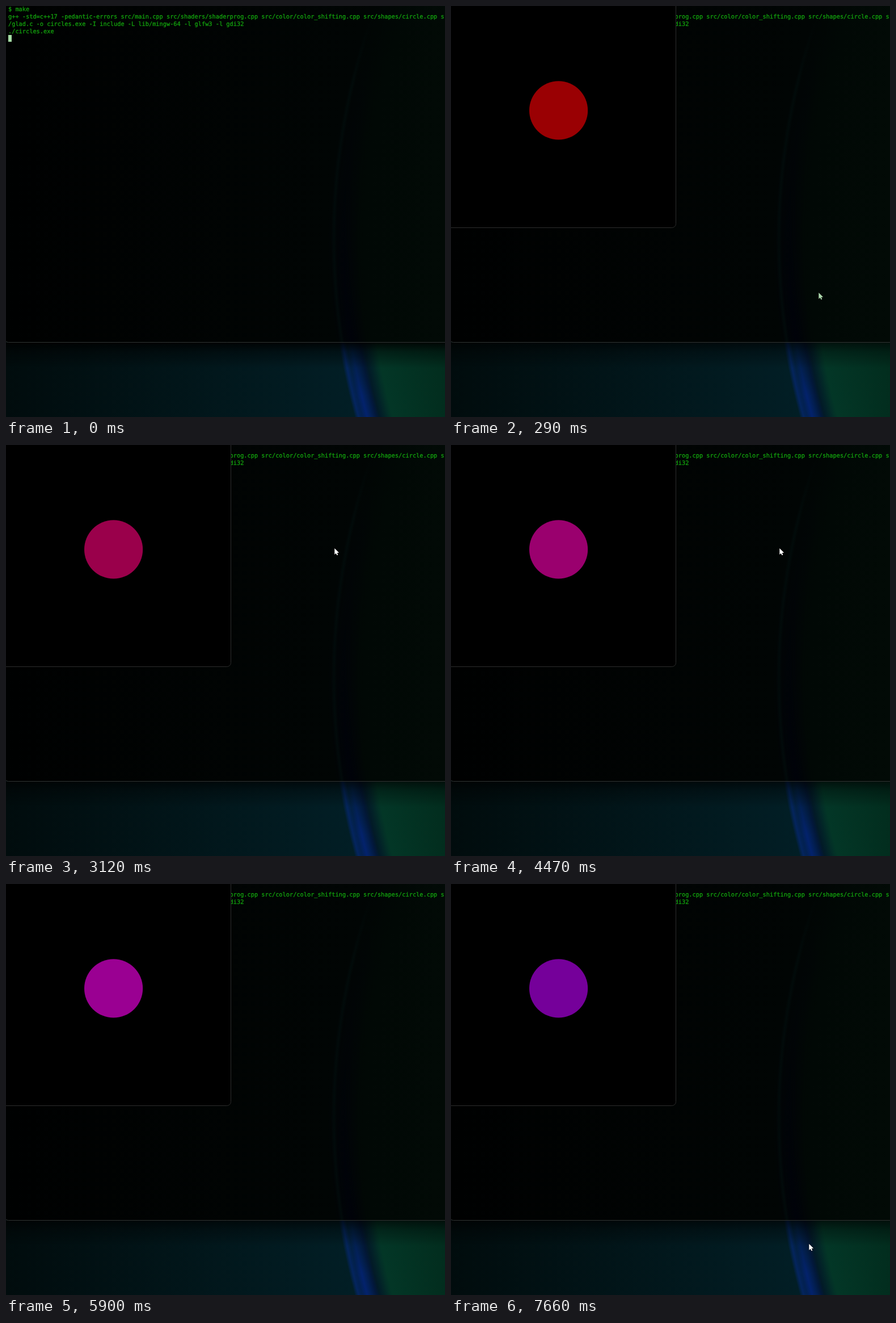
Animation of 774x724 px, one loop 8 s. Source, as an HTML page with a canvas:

```html
<!DOCTYPE html>
<html lang="en">
<head>
<meta charset="utf-8">
<title>Circle colour shift</title>
<style>
html, body { margin: 0; width: 100%; height: 100%; overflow: hidden; background: #000; }
canvas { display: block; }
</style>
</head>
<body>
<canvas id="stage" width="774" height="724"></canvas>
<script>
const W = 774, H = 724, LOOP = 8000;
const FLOOR = 593; // lower edge of the terminal
const OPEN_START = 50, OPEN_END = 290, OPEN_STEPS = 6;
const ctx = document.getElementById('stage').getContext('2d');

const LINES = [
  '$ make',
  'g++ -std=c++17 -pedantic-errors src/main.cpp src/shaders/shaderprog.cpp src/color/color_shifting.cpp src/shapes/circle.cpp s',
  '/glad.c -o circles.exe -I include -L lib/mingw-64 -l glfw3 -l gdi32',
  './circles.exe'
];

// Pointer strokes: each is a Bézier curve continuing from the previous end
const HOME = [648, 505];
const MOVES = [
  { start: 1490, end: 1580, steps: 3, via: [[690, 300]], to: [686, 86] },
  { start: 2000, end: 2370, steps: 8, via: [[660, -10], [540, 220]], to: [520, 232] },
  { start: 2740, end: 2980, steps: 6, via: [[540, 246]], to: [579, 182] },
  { start: 4890, end: 5250, steps: 9, via: [[650, 360]], to: [764, 730] },
  { start: 6460, end: 6640, steps: 5, via: [[700, 600]], to: [645, 551] },
  { start: 6780, end: 6970, steps: 5, via: [[620, 600]], to: [631, 634] }
];
// Redraws while the pointer rests
const REDRAWS = [OPEN_END, 930, 3120, 3760, 4470, 5900, 7660];

const clamp = v => Math.max(0, Math.min(1, v));
const smooth = u => u * u * (3 - 2 * u);
const lerp = (a, b, u) => a.map((v, i) => v + (b[i] - v) * u);

function bezier(points, u) {
  while (points.length > 1) points = points.slice(1).map((p, i) => lerp(points[i], p, u));
  return points[0];
}

function stepIndex({ start, end, steps }, t) {
  const gap = (end - start) / (steps - 1);
  return Math.min(steps - 1, Math.floor((t - start) / gap + 0.001));
}

function pointerAt(t) {
  let tip = HOME;
  for (const move of MOVES) {
    if (t < move.start) break;
    const u = smooth((stepIndex(move, t) + 1) / move.steps);
    tip = bezier([tip, ...move.via, move.to], u);
  }
  return tip;
}

// Time of the latest redraw at or before t
function redrawTime(t) {
  const moving = MOVES.filter(m => m.start <= t)
    .map(m => m.start + (m.end - m.start) / (m.steps - 1) * stepIndex(m, t));
  return Math.max(OPEN_END, ...REDRAWS.filter(r => r <= t), ...moving);
}

// Blue rises to the limit, then red falls
function circleColor(t) {
  const limit = 154, shift = 3 + (redrawTime(t) - OPEN_END) * 0.0255;
  return `rgb(${Math.min(limit, 2 * limit - shift)}, 0, ${Math.min(limit, shift)})`;
}

// The wallpaper's planet rim is a parabola
const rim = y => 577 + 0.000437 * (y - 410) ** 2;

function fillRow(g, y, left, mid, nearRight, right) {
  const grad = g.createLinearGradient(0, 0, W, 0);
  grad.addColorStop(0, left);
  grad.addColorStop((rim(y) - 2) / W, mid);
  grad.addColorStop((rim(y) + 55) / W, nearRight);
  grad.addColorStop(1, right);
  g.fillStyle = grad;
  g.fillRect(0, y, W, 1);
}

// Soft streak that follows the rim at distance dx
function streak(g, y, dx, half, color, alpha) {
  const x = rim(y) + dx;
  const grad = g.createLinearGradient(x - half, 0, x + half, 0);
  grad.addColorStop(0, color + '00');
  grad.addColorStop(0.5, color);
  grad.addColorStop(1, color + '00');
  g.globalAlpha = alpha;
  g.fillStyle = grad;
  g.fillRect(x - half, y, 2 * half, 1);
  g.globalAlpha = 1;
}

function drawWallpaper(g, shade) {
  for (let y = FLOOR - 10; y < H; y++) {
    const glow = clamp((y - 585) / 100);
    fillRow(g, y, '#010c0d', '#021e25', '#033727', '#022d1e');
    streak(g, y, 32, 30, '#021428', 1);
    streak(g, y, 2, 7, '#04265e', 0.9);
    streak(g, y, 17, 22, '#03226c', 0.25 + 0.75 * glow);
  }
  const shadow = g.createLinearGradient(0, FLOOR, 0, FLOOR + 45);
  shadow.addColorStop(0, `rgba(0,0,0,${shade})`);
  shadow.addColorStop(0.35, `rgba(0,0,0,${shade * 0.5})`);
  shadow.addColorStop(1, 'rgba(0,0,0,0)');
  g.fillStyle = shadow;
  g.fillRect(0, FLOOR, W, 45);
}

function drawTerminal(g) {
  g.save();
  g.beginPath();
  g.roundRect(-2.5, -20, W + 40, FLOOR + 19.5, 7);
  g.clip();
  for (let y = 0; y < FLOOR; y++) {
    const depth = clamp((y - 40) / 540);
    fillRow(g, y, '#000101', '#010504', '#010805', '#020a06');
    streak(g, y, 18, 28, '#000209', depth);
    streak(g, y, 1, 5, '#02100f', 0.5 * clamp((y - 20) / 120));
  }
  g.restore();
  g.strokeStyle = '#303332';
  g.stroke();

  g.font = '10.3px "DejaVu Sans Mono", monospace';
  g.textRendering = 'geometricPrecision';
  g.fillStyle = g.strokeStyle = '#13a10e';
  g.lineWidth = 0.3;
  LINES.forEach((line, i) => {
    g.fillText(line, 4, 8.5 + 13 * i);
    g.strokeText(line, 4, 8.5 + 13 * i);
  });
  g.fillStyle = '#a5dca5';
  g.fillRect(4, 51, 6, 12);
}

function makeBackdrop(shade) {
  const layer = document.createElement('canvas');
  layer.width = W;
  layer.height = H;
  const g = layer.getContext('2d');
  drawWallpaper(g, shade);
  drawTerminal(g);
  return layer;
}

const focused = makeBackdrop(0.85), unfocused = makeBackdrop(0.65);

function drawWindow(t) {
  const gap = (OPEN_END - OPEN_START) / (OPEN_STEPS - 1);
  const p = clamp((Math.floor((t - OPEN_START) / gap + 0.001) + 1) / OPEN_STEPS);
  const ease = 1 - (1 - p) ** 3, scale = 0.9 + 0.1 * ease;
  ctx.save();
  ctx.globalAlpha = ease;
  ctx.translate(190, 170);
  ctx.scale(scale, scale);
  ctx.translate(-190, -170);
  ctx.beginPath();
  ctx.roundRect(-16.5, -55.5, 413, 446, 7);
  ctx.fillStyle = '#000';
  ctx.fill();
  ctx.strokeStyle = '#2c2c2c';
  ctx.stroke();
  ctx.beginPath();
  ctx.arc(189.6, 183.9, 51.6, 0, Math.PI * 2);
  ctx.fillStyle = circleColor(t);
  ctx.fill();
  ctx.restore();
}

function drawPointer([x, y], color) {
  const arrow = [[0, 0], [0, 11], [2.5, 8.7], [4.2, 12.2], [6, 11.4], [4.4, 8], [7.8, 7.8]];
  ctx.beginPath();
  for (const [dx, dy] of arrow) ctx.lineTo(x + dx + 0.3, y + dy);
  ctx.closePath();
  ctx.strokeStyle = '#000';
  ctx.stroke();
  ctx.fillStyle = color;
  ctx.fill();
}

function draw() {
  const t = performance.now() % LOOP;
  ctx.drawImage(t < OPEN_START ? focused : unfocused, 0, 0);
  if (t >= OPEN_START) drawWindow(t);
  if (t >= OPEN_END) drawPointer(pointerAt(t), t < MOVES[0].start ? '#acd8ac' : '#fff');
  requestAnimationFrame(draw);
}
draw();
</script>
</body>
</html>
```
